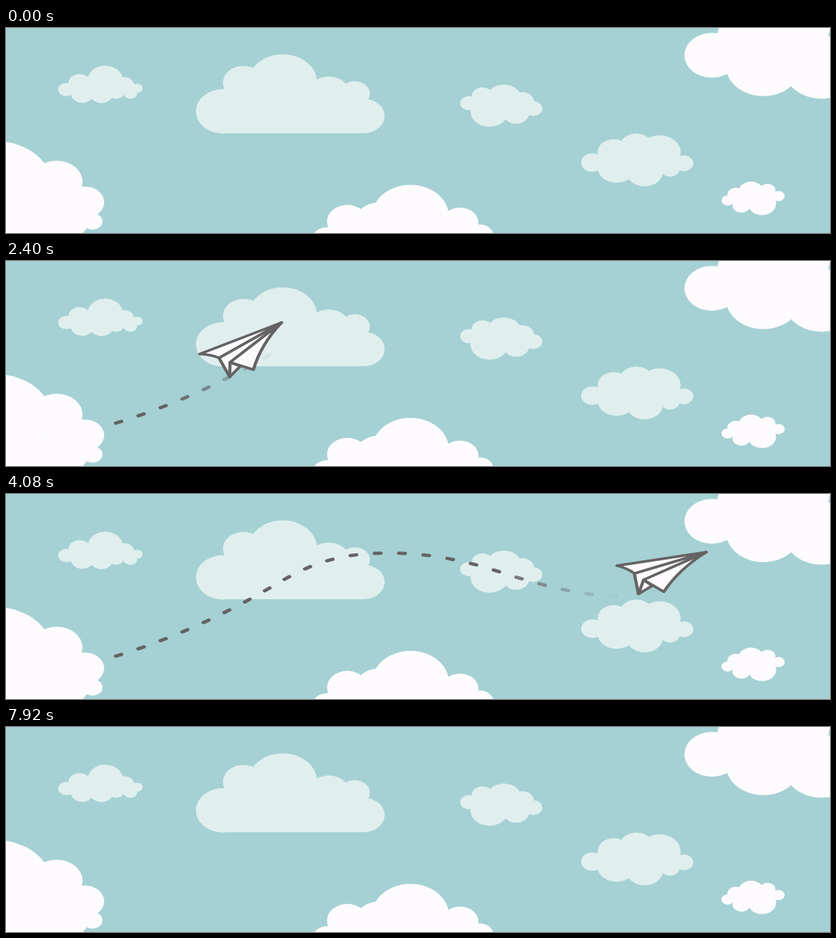
Write an HTML page with a canvas that moves like this. It is 1200 px wide and 300 px high and loops after 8000 ms.

```html
<!DOCTYPE html>
<html lang="en">
<head>
<meta charset="utf-8">
<title>Paper plane</title>
<style>
  html, body { margin: 0; width: 100%; height: 100%; overflow: hidden; background: #a5d1d4; }
  canvas { display: block; width: 1200px; height: 300px; }
  svg { position: absolute; width: 0; height: 0; }
</style>
</head>
<body>
<canvas id="stage" width="1200" height="300"></canvas>
<svg><path id="route" d="M-36 373 L164 295 Q280.7 249.5 394 164.5 C447 124.7 488 108 558 108
  Q634.5 108 715 141 Q825 186.2 884 186.2 Q949 186.2 1017 142.5 L1300 -25"/></svg>
<script>
const ctx = document.getElementById('stage').getContext('2d');
const route = document.getElementById('route');
const LOOP = 8000;
const SQUASH = 0.8; // route and plane are laid out unsquashed, then flattened
const SKY = '#a5d1d4', PALE = '#e0efee', WHITE = '#fdfbfe', INK = '#656364';

// The dashes are evenly spaced between the two straight ends of the route.
const DASHES = 28;
const FIRST = Math.hypot(200, 78);
const SPACING = (route.getTotalLength() - Math.hypot(252, 149) - FIRST) / (DASHES - 1);
const HALF_DASH = 0.12;

const clamp = v => Math.min(1, Math.max(0, v));

// Point on the route; u counts dashes from the first one.
function pointAt(u) {
  const { x, y } = route.getPointAtLength(FIRST + u * SPACING);
  return [x, y];
}

function headingAt(u) {
  const [x0, y0] = pointAt(u - 0.3), [x1, y1] = pointAt(u + 0.3);
  return Math.atan2(y1 - y0, x1 - x0);
}

// Round lobes [x, y, radius] in order around the rim; radius 0 is a plain corner.
function cloud(color, ...lobes) {
  ctx.fillStyle = color;
  ctx.beginPath();
  for (const [x, y] of lobes) ctx.lineTo(x, y);
  ctx.fill();
  for (const [x, y, r] of lobes) {
    ctx.beginPath();
    ctx.ellipse(x, y, r, r * 0.82, 0, 0, Math.PI * 2);
    ctx.fill();
  }
}

function drawFarClouds() {
  cloud(PALE, [88, 90, 12], [107, 80.5, 16], [144.5, 76, 25.5], [172, 84, 14.5],
    [191, 88, 8], [181, 95.5, 10], [160.5, 94, 11.5], [139, 96, 17], [111, 96, 16.5]);
  cloud(PALE, [316, 122, 39.5], [346, 80, 30], [403, 79.5, 50], [470, 95.5, 30],
    [508, 96, 22], [521, 128.8, 30.5], [521, 154, 0], [316, 154, 0]);
  cloud(PALE, [674, 110, 12.5], [694, 100, 16], [725, 104, 26], [752, 108, 17],
    [768, 118, 13], [743, 124.5, 19], [704, 122, 27.5]);
  cloud(PALE, [854, 197, 16.5], [885, 182, 23.5], [918, 175, 25], [952, 182, 30.5],
    [987, 198, 14], [967, 206, 14], [930, 209.5, 27], [889, 204, 27.5]);
}

function drawNearClouds() {
  cloud(WHITE, [1051, 252.5, 9], [1063, 244, 12.5], [1085, 240, 18.5], [1109, 237.5, 11.5],
    [1125, 246, 9], [1101, 257, 20.5], [1071, 259.5, 13]);
  cloud(WHITE, [-14, 233, 82], [74, 225, 37.5], [115, 255, 28], [126, 283, 14.5],
    [112, 300, 0], [0, 300, 0]);
  cloud(WHITE, [469, 311, 24], [497, 283, 29.5], [543, 285, 36], [589, 275.5, 56],
    [661, 285, 27], [690, 304, 20]);
  cloud(WHITE, [1028, 40, 40], [1103, 54.5, 55], [1188, 57.5, 56], [1200, 0, 0], [1038, 0, 0]);
}

// Dashes fade in one after another, then the trail is wiped from its start.
function drawTrail(t) {
  const erased = t < 6800 ? -1 : (t - 6800) * 0.0244 - 0.1;
  ctx.lineWidth = 6;
  for (let i = 0; i < DASHES; i++) {
    const from = Math.max(i - HALF_DASH, erased), to = i + HALF_DASH;
    const fade = clamp((t - 1532 - 113 * i) / 600) ** 1.2;
    if (!fade || from > to) continue;
    ctx.globalAlpha = fade;
    ctx.beginPath();
    ctx.moveTo(...pointAt(from));
    ctx.lineTo(...pointAt(to));
    ctx.stroke();
  }
  ctx.globalAlpha = 1;
}

// Sine ease along the route; the far end lies beyond the stage.
const planeAt = t => 23.8 * (1 - Math.cos(Math.PI * clamp((t - 380) / 6667))) - 4.87;

function drawPlane(t) {
  const u = planeAt(t);
  ctx.save();
  ctx.translate(...pointAt(u));
  ctx.rotate(headingAt(u + 1) + 27.3 * Math.PI / 180);
  ctx.lineWidth = 4.6;
  ctx.fillStyle = WHITE;

  const keel = [0, 0], nose = [87.5, -89], notch = [-11, -36.3], fold = [4, -26.3];
  const panel = (...steps) => {
    ctx.beginPath();
    ctx.moveTo(...nose);
    for (const s of steps) s.length > 2 ? ctx.quadraticCurveTo(...s) : ctx.lineTo(...s);
    ctx.closePath();
    ctx.fill();
    ctx.stroke();
  };
  panel(notch, keel, [18, -17.5], fold);
  panel([-38, -46.9], [-22, -44, ...notch]);
  panel(fold, [36, -8.8], [53, -54, ...nose]);
  ctx.beginPath();
  ctx.moveTo(...fold);
  ctx.lineTo(...keel);
  ctx.stroke();
  ctx.restore();
}

function draw(t) {
  ctx.fillStyle = SKY;
  ctx.fillRect(0, 0, 1200, 300);
  drawFarClouds();
  ctx.save();
  ctx.scale(1, SQUASH);
  ctx.strokeStyle = INK;
  ctx.lineCap = ctx.lineJoin = 'round';
  drawTrail(t);
  if (t < 5000) drawPlane(t);
  ctx.restore();
  drawNearClouds();
}

const start = performance.now();
function frame() {
  draw((performance.now() - start) % LOOP);
  requestAnimationFrame(frame);
}
frame();
</script>
</body>
</html>
```
